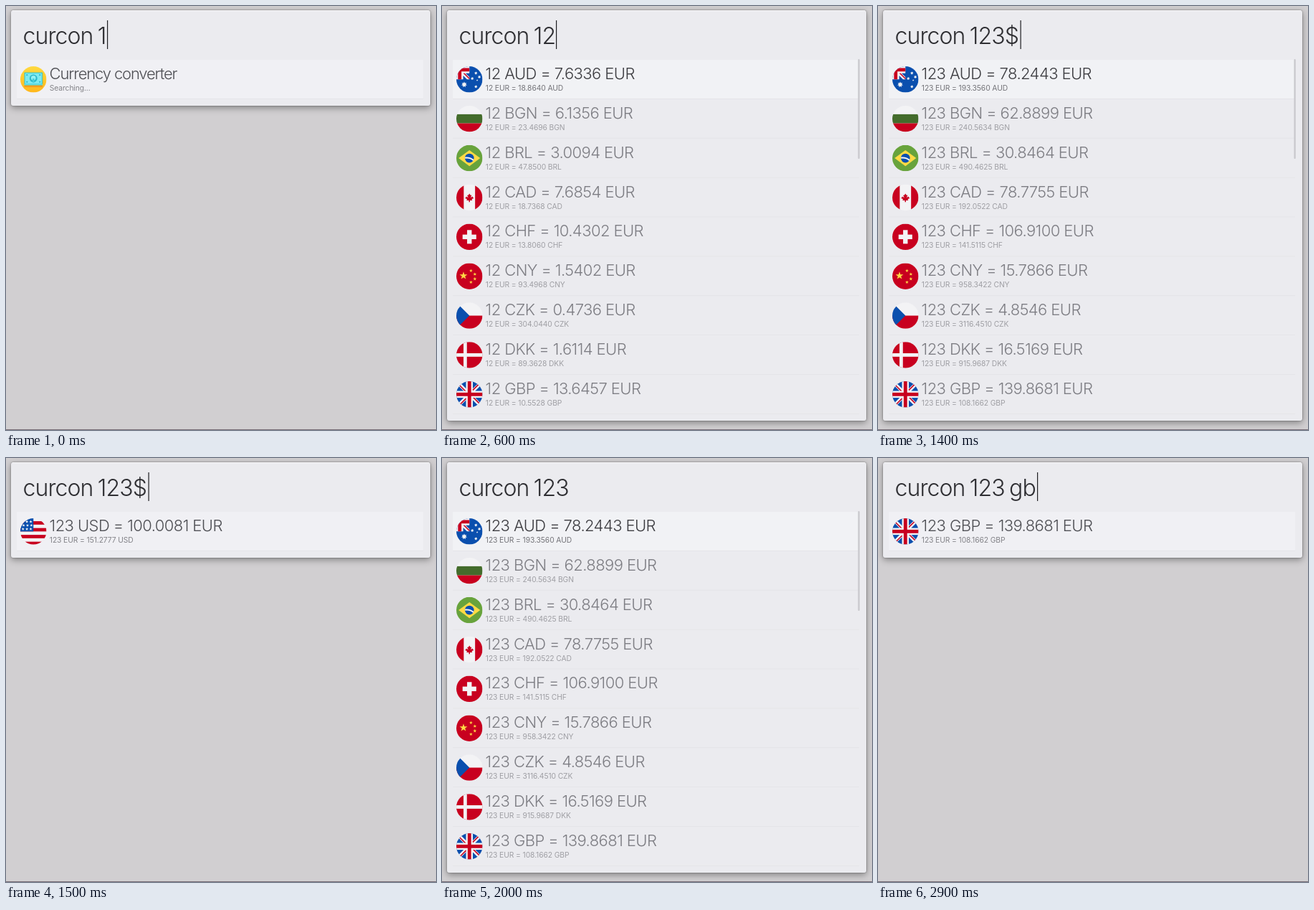
An HTML page that plays this animation: 600x591 px, repeating every 3100 ms.

```html
<!DOCTYPE html>
<html lang="en">
<head>
<meta charset="utf-8">
<title>Currency converter</title>
<style>
  html, body { margin: 0; width: 100%; height: 100%; overflow: hidden; background: #d1cfd1; }
  svg { display: block; width: 600px; height: 591px; }
  text { font-family: Inter, "Open Sans", sans-serif; font-optical-sizing: none; white-space: pre; }
  .query { font-size: 32px; font-weight: 300; letter-spacing: -.9px; word-spacing: -1.8px; fill: #2e2e32; }
  .title { font-size: 22px; font-weight: 300; letter-spacing: -.58px; fill: #7d7d83; }
  .label { letter-spacing: -1.15px; }
  .sub { font-size: 10.3px; letter-spacing: -.1px; fill: #9f9fa4; }
  .on .title { fill: #3c3c40; }
  .on .sub { fill: #747479; }
  .solo .title { fill: #4e4f54; }
  .solo .sub { fill: #838388; }
  #panel { filter: drop-shadow(0 0 1px rgba(0,0,0,.38)) drop-shadow(0 3px 5px rgba(0,0,0,.36)); }
</style>
</head>
<body>
<svg viewBox="0 0 600 591">
  <defs>
    <clipPath id="disc"><circle cx="256" cy="256" r="256"/></clipPath>
    <linearGradient id="coin" x1="0" y1="0" x2="0" y2="1">
      <stop offset="0" stop-color="#ffd93f"/><stop offset="1" stop-color="#ffb71c"/>
    </linearGradient>
  </defs>
  <rect width="600" height="591" fill="#d1cfd1"/>
  <rect id="panel" x="7" y="6" width="585" rx="3" fill="#ebebef"/>
  <rect x="9" y="6" width="581" height="1" fill="#f8f8fa"/>
  <text id="query" class="query" x="23.5" y="53"></text>
  <rect id="caret" y="20" width="1.2" height="40" fill="#1e1e22"/>
  <g id="rows"></g>
  <rect id="bar" x="580.5" y="74" width="2.2" height="139" rx="1" fill="#c8c7cc"/>
  <rect y="590" width="600" height="1" fill="#776c76"/>
</svg>
<script>
const LOOP = 3100, ROW = 54.87;
const RED = '#c8001f', BLUE = '#0a4fae', WHITE = '#f3f3f5', YELLOW = '#ffda44', GREEN = '#68a33c';

// shape helpers, all on a 512 x 512 disc
const rect = (x, y, w, h, c) => `<rect x="${x}" y="${y}" width="${w}" height="${h}" fill="${c}"/>`;
const circle = (x, y, r, c) => `<circle cx="${x}" cy="${y}" r="${r}" fill="${c}"/>`;
const path = (d, c) => `<path d="${d}" fill="${c}"/>`;
const fill = c => rect(0, 0, 512, 512, c);

function star(x, y, r, c, n = 5, inner = .4) {
  let d = '';
  for (let i = 0; i < 2 * n; i++) {
    const a = Math.PI * i / n, k = i % 2 ? r * inner : r;
    d += `${i ? 'L' : 'M'}${(x + k * Math.sin(a)).toFixed(1)} ${(y - k * Math.cos(a)).toFixed(1)}`;
  }
  return path(d + 'Z', c);
}

function unionJack() {
  const arm = '<path d="M323 323L437 437L452 421L354 323Z"/>';
  const arms = [0, 90, 180, 270].map(a => `<g transform="rotate(${a} 256 256)">${arm}</g>`).join('');
  return fill(BLUE) +
    `<path d="M0 0L512 512M512 0L0 512" stroke="${WHITE}" stroke-width="67"/>` +
    rect(189, 0, 134, 512, WHITE) + rect(0, 189, 512, 134, WHITE) +
    `<g fill="${RED}">${arms}</g>` +
    rect(222, 0, 68, 512, RED) + rect(0, 222, 512, 68, RED);
}

function stripes() {
  let s = fill(WHITE);
  for (let y = 56; y < 512; y += 133.5) s += rect(0, y, 512, 66.8, RED);
  s += rect(0, 0, 256, 256, BLUE);
  for (let r = 0; r < 3; r++)
    for (let c = 0; c < 3; c++) s += star(52 + c * 76 + (r === 1 ? 12 : 0), 66 + r * 72, 31, WHITE);
  return s;
}

const icons = {
  MONEY: fill('url(#coin)') +
    rect(76, 374, 360, 34, '#f29c1f') +
    rect(78, 120, 356, 250, '#29bfd0') + rect(92, 134, 328, 206, '#7deaf0') +
    rect(78, 346, 356, 12, '#8df0f3') +
    circle(256, 236, 76, '#2fb9cb') + circle(256, 226, 46, '#93f1f4') +
    rect(238, 238, 36, 84, '#48cfdb') +
    circle(130, 170, 16, '#2fb9cb') + circle(382, 170, 16, '#2fb9cb') +
    circle(130, 304, 16, '#2fb9cb') + circle(382, 304, 16, '#2fb9cb'),
  AUD: fill(BLUE) +
    path('M0 0H256V134H181L256 209V256H209L134 181V256H0Z', WHITE) +
    path('M33 33H256V100H100V256H33Z', RED) + path('M134 134H165L256 225V256Z', RED) +
    star(154, 356, 57, WHITE, 7, .55) + star(383, 398, 33, WHITE, 7, .5) +
    star(312, 238, 33, WHITE, 7, .5) + star(383, 132, 33, WHITE, 7, .5) +
    star(450, 208, 33, WHITE, 7, .5) + star(408, 272, 20, WHITE),
  BGN: fill(WHITE) + rect(0, 167, 512, 178, '#446c2c') + rect(0, 345, 512, 167, RED),
  BRL: fill(GREEN) + path('M256 100L467 256L256 412L45 256Z', YELLOW) + circle(256, 256, 89, BLUE) +
    `<path d="M170 250Q270 236 334 298" fill="none" stroke="${WHITE}" stroke-width="30"/>`,
  CAD: fill(WHITE) + rect(0, 0, 145, 512, RED) + rect(367, 0, 145, 512, RED) +
    path('M301 289L345 267L323 256V234L278 256L301 211H278L256 178L234 211H211L234 256' +
      'L189 234V256L167 267L211 289L200 312H245V345H267V312H312Z', RED),
  CHF: fill(RED) + rect(211, 122, 90, 268, WHITE) + rect(122, 211, 268, 90, WHITE),
  CNY: fill(RED) + star(140, 246, 80, YELLOW) + star(286, 148, 36, YELLOW) +
    star(362, 215, 36, YELLOW) + star(362, 308, 36, YELLOW) + star(286, 372, 36, YELLOW),
  CZK: fill(WHITE) + rect(0, 256, 512, 256, RED) + path('M0 0L256 256L0 512Z', BLUE),
  DKK: fill(RED) + rect(140, 0, 67, 512, WHITE) + rect(0, 222, 512, 68, WHITE),
  GBP: unionJack(),
  USD: stripes(),
  SGD: fill(WHITE) + rect(0, 0, 512, 256, RED) + circle(202, 142, 70, WHITE) + circle(230, 142, 62, RED) +
    [0, 1, 2, 3, 4].map(i => {
      const a = i * Math.PI * .4;
      return star(276 + 46 * Math.sin(a), 144 - 46 * Math.cos(a), 23, WHITE);
    }).join('')
};

// value of 123 units in EUR, and of 123 EUR in the currency
const rates = {
  AUD: [78.2443, 193.3560], BGN: [62.8899, 240.5634], BRL: [30.8464, 490.4625],
  CAD: [78.7755, 192.0522], CHF: [106.9100, 141.5115], CNY: [15.7866, 958.3422],
  CZK: [4.8546, 3116.4510], DKK: [16.5169, 915.9687], GBP: [139.8681, 108.1662],
  USD: [100.0081, 151.2777], SGD: [75.6737, 199.9242]
};
const all = Object.keys(rates).slice(0, 9);

// start time, typed text, caret x (0 = hidden), amount, listed currencies
const scenes = [
  [0, '1', 141, 0, ['MONEY']],
  [200, '1', 141, 1, all],
  [400, '12', 159, 1, all],
  [500, '12', 159, 12, all],
  [900, '123', 178.5, 12, all],
  [1000, '123', 178.5, 123, all],
  [1300, '123$', 198.5, 123, all],
  [1500, '123$', 198.5, 123, ['USD']],
  [1900, '123', 178.5, 123, ['USD']],
  [2000, '123', 0, 123, all],
  [2200, '123 ', 187, 123, all],
  [2400, '123 g', 204, 123, all],
  [2500, '123 g', 204, 123, ['BGN', 'GBP', 'SGD']],
  [2800, '123 gb', 222, 123, ['BGN', 'GBP', 'SGD']],
  [2900, '123 gb', 222, 123, ['GBP']]
];

function rowMarkup(code, i, amount, count) {
  let title = 'Currency converter', sub = 'Searching...', kind = 'title label';
  if (rates[code]) {
    const [toEur, fromEur] = rates[code].map(v => (v * amount / 123).toFixed(4));
    title = `${amount} ${code} = ${toEur} EUR`;
    sub = `${amount} EUR = ${fromEur} ${code}`;
    kind = 'title';
  }
  const state = i ? '' : count === 1 ? 'solo' : 'on';
  const back = i ? '' : rect(15, 1, 567, 54, count === 1 ? '#f0f0f4' : '#f1f2f5');
  return `<g class="${state}" transform="translate(0 ${74 + i * ROW})">${back}` +
    rect(15, ROW, 567, 1, '#e5e5e9') +
    `<g transform="translate(20 10.1) scale(.0713)"><g clip-path="url(#disc)">${icons[code]}</g></g>` +
    `<text class="${kind}" x="60.6" y="28">${title}</text>` +
    `<text class="sub" x="60.8" y="44">${sub}</text></g>`;
}

const el = id => document.getElementById(id);
let shown = null;

function draw(t) {
  const scene = scenes.filter(s => s[0] <= t).pop();
  if (scene === shown) return;
  shown = scene;
  const [, typed, caret, amount, codes] = scene;
  const n = codes.length;
  el('query').textContent = 'curcon ' + typed;
  el('caret').setAttribute('x', caret);
  el('caret').setAttribute('visibility', caret ? 'visible' : 'hidden');
  el('panel').setAttribute('height', 78.2 + n * ROW);
  el('bar').setAttribute('visibility', n === 9 ? 'visible' : 'hidden');
  el('rows').innerHTML = codes.map((c, i) => rowMarkup(c, i, amount, n)).join('');
}

function tick() {
  draw(performance.now() % LOOP);
  requestAnimationFrame(tick);
}
tick();
</script>
</body>
</html>
```
